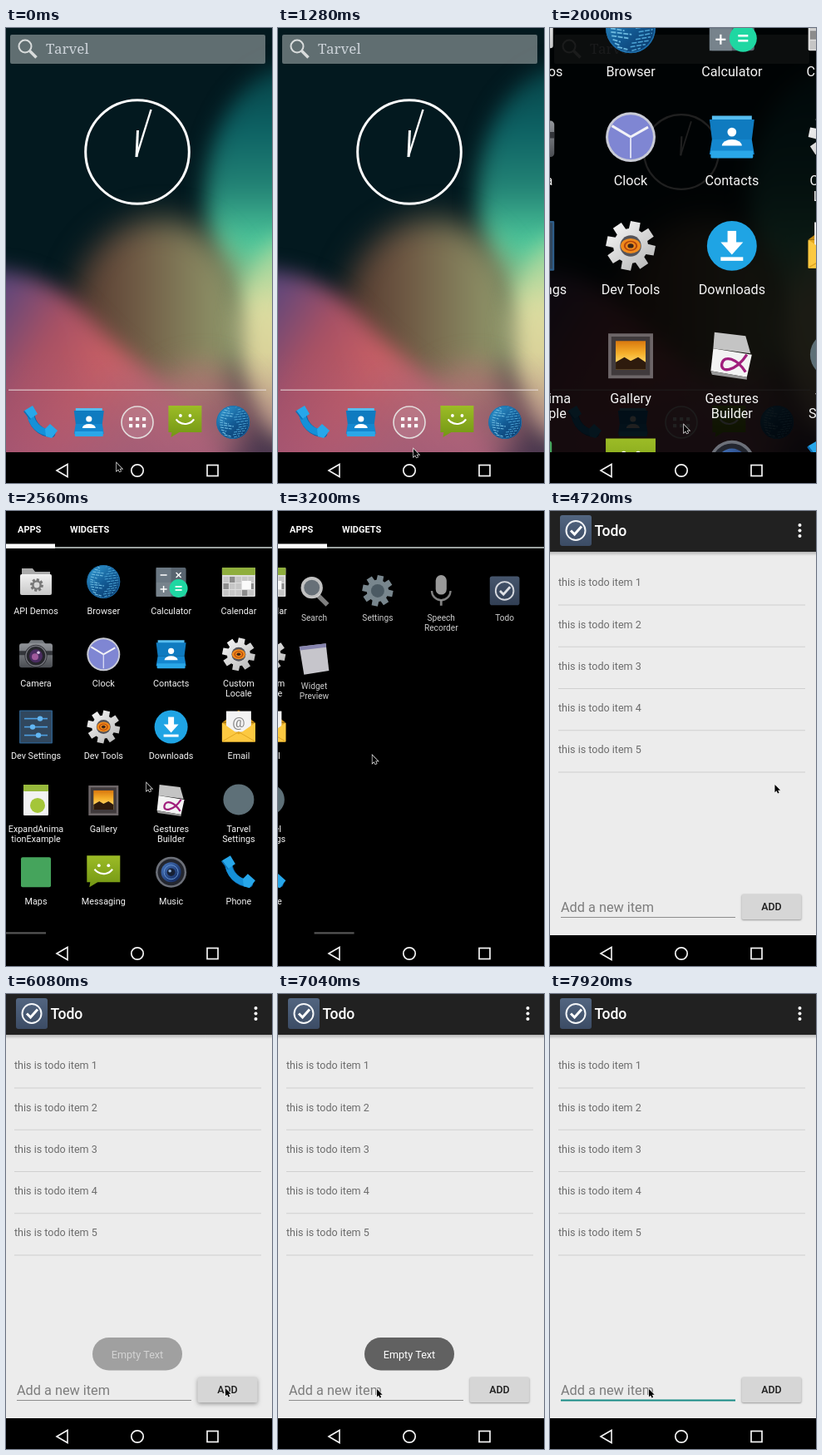
An HTML page with a canvas that plays this animation: 320x547 px, repeating every 8000 ms.

```html
<!DOCTYPE html>
<html lang="en">
<head>
<meta charset="utf-8">
<title>Todo app demo</title>
<style>
html, body { margin: 0; width: 100%; height: 100%; overflow: hidden; background: #000; }
canvas { display: block; width: 320px; height: 547px; }
</style>
</head>
<body>
<canvas id="stage"></canvas>
<script>
const W = 320, H = 547, BODY = 510, LOOP = 8000, TAU = Math.PI * 2;
const canvas = document.getElementById('stage');
const dpr = window.devicePixelRatio || 1;
canvas.width = W * dpr;
canvas.height = H * dpr;
const screen = canvas.getContext('2d');
let c = screen;

const clamp = v => Math.max(0, Math.min(1, v));
const span = (t, from, to) => clamp((t - from) / (to - from));
const mix = (a, b, k) => a + (b - a) * k;
const smooth = k => k * k * (3 - 2 * k);
const easeOut = (k, p = 2) => 1 - Math.pow(1 - k, p);

// Drawing helpers
function rect(x, y, w, h, color, r = 0) {
  c.fillStyle = color;
  c.beginPath();
  c.roundRect(x, y, w, h, r);
  c.fill();
}
function disc(x, y, r, color) {
  c.fillStyle = color;
  c.beginPath();
  c.arc(x, y, r, 0, TAU);
  c.fill();
}
function ring(x, y, r, color, width, from = 0, to = TAU) {
  c.strokeStyle = color;
  c.lineWidth = width;
  c.beginPath();
  c.arc(x, y, r, from, to);
  c.stroke();
}
function trace(points, closed) {
  c.beginPath();
  for (let i = 0; i < points.length; i += 2) c.lineTo(points[i], points[i + 1]);
  if (closed) c.closePath();
}
function poly(points, color) {
  trace(points, true);
  c.fillStyle = color;
  c.fill();
}
function line(points, color, width, closed = false) {
  trace(points, closed);
  c.strokeStyle = color;
  c.lineWidth = width;
  c.stroke();
}
function text(str, x, y, size, color, weight = 400, align = 'left', family = 'Roboto, sans-serif') {
  c.font = `${weight} ${size}px ${family}`;
  c.fillStyle = color;
  c.textAlign = align;
  c.fillText(str, x, y);
}
function shade(x0, y0, x1, y1, ...colors) {
  const g = c.createLinearGradient(x0, y0, x1, y1);
  colors.forEach((color, i) => g.addColorStop(i / (colors.length - 1), color));
  return g;
}
function at(x, y, scale, draw) {
  c.save();
  c.translate(x, y);
  c.scale(scale, scale);
  draw();
  c.restore();
}

// Icons, each centred on 0,0 and about 40 px wide
function gear(color, hub) {
  c.fillStyle = color;
  c.beginPath();
  for (let i = 0; i < 8; i++) {
    const a = i / 8 * TAU + 0.2;
    [[-0.3, 14], [-0.2, 20], [0.2, 20], [0.3, 14]].forEach(([d, r]) =>
      c.lineTo(Math.cos(a + d) * r, Math.sin(a + d) * r));
  }
  c.closePath();
  c.fill();
  disc(0, 0, 8.5, hub);
}

const icons = {
  browser() {
    disc(0, 0, 20, shade(-14, -18, 14, 18, '#3097cf', '#135c96', '#0b3a6c'));
    c.save();
    c.beginPath();
    c.arc(0, 0, 19.5, 0, TAU);
    c.clip();
    c.setLineDash([4, 1]);
    for (let i = -6; i <= 6; i++) {
      const y = i * 3, w = Math.sqrt(400 - y * y);
      line([-w * 0.8, y, -w * 0.8 + w * (0.55 + 0.3 * Math.sin(i * 1.3)), y + 2], '#6cb9df', 1.2);
      line([w * 0.2 + 3 * Math.sin(i), y, w * 0.9, y - 2], '#4ba3d4', 1);
    }
    c.restore();
    ring(0, 0, 19.4, '#1d6ea9', 1);
  },
  phone() {
    c.lineCap = 'round';
    const handset = (color, width, d) => {
      c.strokeStyle = color;
      c.lineWidth = width;
      c.beginPath();
      c.moveTo(-13 + d, -12 + d);
      c.bezierCurveTo(-12 + d, 2 + d, -2 + d, 12 + d, 12 + d, 13 + d);
      c.stroke();
    };
    handset('#0b64a6', 9, 0.8);
    handset('#1590d8', 8, 0);
    poly([-20, -14, -10, -20, -4, -10, -13, -4], '#27a7ea');
    poly([5, 8, 11, 2, 20, 10, 13, 19, 6, 17], '#27a7ea');
    line([-20, -13, -13, -4], '#0d70b5', 1.5);
  },
  contacts() {
    rect(-16, -17, 32, 4, '#56bdf0');
    poly([-18, -14, 18, -14, 16, 2, -16, 2], '#0f7bc0');
    poly([-16, 2, 16, 2, 18, 14, -18, 14], '#1487cf');
    rect(-17, 11, 34, 6, '#2aa7e8', 1);
    disc(0, -4, 3.6, '#fff');
    c.fillStyle = '#fff';
    c.beginPath();
    c.ellipse(0, 7, 8, 5, 0, Math.PI, TAU);
    c.fill();
  },
  messaging() {
    poly([-20, -20, 20, -20, 20, 12, -7, 12, -17, 18, -16, 12, -20, 12], shade(0, -20, 0, 14, '#9cbc26', '#779a16'));
    disc(-5.5, -8, 1.9, '#fff');
    disc(6, -8, 1.9, '#fff');
    ring(0, -11, 13, '#fff', 2.2, 0.6, Math.PI - 0.6);
  },
  folder() {
    poly([-17, -16, -4, -16, -1, -12, 17, -12, 17, 14, -17, 14], '#aaa');
    rect(-19, -9, 38, 25, shade(0, -9, 0, 16, '#f1f1f1', '#c8c8c8'), 2);
    at(1, 4, 0.4, () => gear('#777', '#d8d8d8'));
  },
  calculator() {
    rect(-18, -17, 36, 35, '#596570', 2);
    rect(-18, -17, 18, 17.5, '#6b7883');
    rect(-18, 0.5, 18, 17.5, '#77838c');
    line([-13, -8, -5, -8], '#fff', 1.5);
    line([6, -11, 12, -5], '#fff', 1.4);
    line([12, -11, 6, -5], '#fff', 1.4);
    line([-13, 9, -5, 9], '#fff', 1.5);
    line([-9, 5, -9, 13], '#fff', 1.5);
    disc(9, 8, 11, '#1fd7a2');
    line([5, 6, 13, 6], '#fff', 1.7);
    line([5, 10, 13, 10], '#fff', 1.7);
  },
  calendar() {
    rect(-20, -17, 40, 35, '#dedede', 1);
    rect(-20, -17, 40, 9, '#8fae3d', 1);
    for (let i = 0; i < 15; i++) {
      const col = i % 5, row = Math.floor(i / 5);
      rect(-18.5 + col * 7.5, -6 + row * 8, 6.5, 7, (col + row) % 4 === 1 ? '#8c8c8c' : '#c6c6c6');
    }
    rect(4, -1, 11, 10, '#fafafa');
  },
  camera() {
    poly([-10, -12, -6, -17, 8, -17, 12, -12], '#777b80');
    rect(-20, -13, 40, 29, shade(0, -13, 0, 16, '#92959a', '#4a4d52'), 3);
    rect(-20, -4, 40, 5, '#33353a');
    disc(0, 2, 13.5, '#26262c');
    ring(0, 2, 12, '#73757b', 1.5);
    disc(0, 2, 8, '#4a2c61');
    disc(-1, 3, 4, '#a05a9c');
    disc(3, -2, 1.8, '#d7c2e2');
  },
  clock() {
    disc(0, 0, 20, '#c9cbd6');
    disc(0, 0, 18, '#7f86d3');
    line([-15, -9, 0, 0, 14, -8], '#f2f2f7', 2);
    line([0, 0, 0, 17], '#dcdef4', 1.3);
  },
  tools() {
    gear(shade(-15, -18, 15, 18, '#f5f5f5', '#b9b9b9'), '#55545a');
    c.scale(1, 0.75);
    disc(0, 0, 8, '#f08a1c');
    ring(0, 0, 4.8, '#b4460c', 1.4);
    disc(0, 0, 2.4, '#3a2418');
  },
  sliders() {
    rect(-20, -20, 40, 40, '#2d5c87', 1);
    rect(-18.5, -18.5, 37, 37, '#31475d');
    [[-10, 5], [0, -4], [10, 3]].forEach(([y, x]) => {
      line([-14, y, 14, y], '#4e9fe0', 1.6);
      disc(x, y, 3.2, '#62b6f2');
    });
  },
  downloads() {
    disc(0, 0, 20, '#1fa4e4');
    rect(-3.5, -12, 7, 10, '#fff');
    poly([-9, -3, 9, -3, 0, 7], '#fff');
    rect(-9, 9, 18, 3, '#fff');
  },
  email() {
    rect(-20, -5, 40, 23, '#e5a71d', 1);
    poly([-20, -5, 0, -20, 20, -5], '#c48a12');
    rect(-15, -19, 30, 25, '#f3f3f3');
    text('@', 0, 0, 17, '#858585', 400, 'center');
    poly([-20, -5, 0, 9, 20, -5, 20, 18, -20, 18], '#fcc941');
    line([-19, 17, 0, 6, 19, 17], '#e0a521', 1);
  },
  project() {
    rect(-15, -18, 30, 37, '#f2f2f2', 1);
    rect(-15, -18, 30, 8, '#97b93b', 1);
    disc(2, 7, 9, '#a4c639');
  },
  gallery() {
    rect(-18, -17, 36, 36, '#6d6668');
    rect(-15.5, -14.5, 31, 31, '#403a3c');
    rect(-12, -11, 24, 23, shade(0, -11, 0, 9, '#d9780e', '#f6b02c', '#ffe27a'));
    poly([-12, 6, -5, 2, 0, 5, 6, 2, 12, 6, 12, 12, -12, 12], '#2e1b0d');
  },
  gestures() {
    poly([-14, -18, 11, -15, 15, -1, -15, -5], '#c4c4c4');
    poly([-15, -5, 16, 0, 12, 18, -17, 13], '#f3f3f3');
    poly([-17, 13, 12, 18, 12, 20, -16, 16], '#999');
    c.strokeStyle = '#a01e7c';
    c.lineWidth = 2.2;
    c.beginPath();
    c.moveTo(12, 0);
    c.bezierCurveTo(3, 14, -10, 15, -8, 7);
    c.bezierCurveTo(-6, 0, 4, 3, 11, 14);
    c.stroke();
  },
  service() { disc(0, 0, 18.5, '#5e7078'); },
  maps() { rect(-18, -18, 36, 36, '#45a45c', 2); },
  music() {
    disc(0, 0, 18.5, '#6c7079');
    disc(0, 0, 16, '#23262f');
    disc(0, 0, 12, shade(-8, -8, 8, 8, '#3e69ad', '#172e64'));
    ring(0, 0, 8.5, '#6493d0', 1);
    disc(0, 0, 4.8, '#172034');
    disc(-1.5, -1.5, 1.8, '#8fb2de');
  },
  search() {
    line([5, 6, 17, 18], '#999', 6);
    disc(-3, -4, 14, '#e6e6e6');
    disc(-3, -4, 10, '#56616a');
  },
  settings() { gear('#90a0a8', '#43525a'); },
  recorder() {
    rect(-7, -20, 14, 25, '#b7b7b7', 7);
    ring(0, 0, 12, '#999', 2.5, 0, Math.PI);
    line([0, 12, 0, 19], '#999', 3);
  },
  todo() {
    rect(-19, -18.5, 38, 37, shade(0, -18, 0, 18, '#526580', '#3c4c65'), 3);
    ring(0, 0, 11.5, '#f4f6f8', 2);
    line([-6, 0, -1.5, 4.5, 7, -5], '#fff', 3);
  },
  widgets() {
    poly([-19, -16, 15, -20, 19, 15, -13, 20], '#ecebf2');
    poly([-19, -16, 15, -20, 15.5, -15, -18, -11], '#7a78a8');
  }
};

const pages = [
  ['folder|API Demos', 'browser|Browser', 'calculator|Calculator', 'calendar|Calendar',
   'camera|Camera', 'clock|Clock', 'contacts|Contacts', 'tools|Custom|Locale',
   'sliders|Dev Settings', 'tools|Dev Tools', 'downloads|Downloads', 'email|Email',
   'project|ExpandAnima|tionExample', 'gallery|Gallery', 'gestures|Gestures|Builder', 'service|Tarvel|Settings',
   'maps|Maps', 'messaging|Messaging', 'music|Music', 'phone|Phone'],
  ['search|Search', 'settings|Settings', 'recorder|Speech|Recorder', 'todo|Todo', 'widgets|Widget|Preview']
];

function drawPage(list) {
  list.forEach((entry, i) => {
    const [icon, ...label] = entry.split('|');
    const x = 36 + (i % 4) * 81.3, y = 85 + Math.floor(i / 4) * 87.3;
    at(x, y, 1, icons[icon]);
    label.forEach((row, n) => text(row, x, y + 38.7 + n * 12.3, 10.8, '#f4f4f4', 400, 'center'));
  });
}

// Wallpaper of blurred blobs, painted once
function makeWallpaper() {
  const sheet = document.createElement('canvas');
  sheet.width = W;
  sheet.height = BODY;
  c = sheet.getContext('2d');
  rect(0, 0, W, BODY, '#03191f');
  const blob = (x, y, rx, ry, blur, fill, alpha = 1) => {
    c.filter = `blur(${blur}px)`;
    c.globalAlpha = alpha;
    c.fillStyle = fill;
    c.beginPath();
    c.ellipse(x, y, rx, ry, 0, 0, TAU);
    c.fill();
  };
  blob(350, 205, 110, 160, 13, shade(0, 55, 0, 330, '#07454a', '#0d6264', '#238375', '#4fcb9d', '#8fc08c'));
  blob(185, 352, 108, 122, 18, shade(75, 0, 300, 0, '#4f352c', '#6d5642', '#84805c', '#96a673'));
  blob(345, 375, 66, 125, 13, shade(0, 260, 0, 490, '#8fd59c', '#dcdca0', '#d9cf98', '#c3ab88'));
  blob(235, 470, 62, 62, 18, '#bb7a74', 0.8);
  c.filter = 'blur(12px)';
  c.globalAlpha = 0.95;
  c.fillStyle = shade(0, 310, 190, 430, '#664a80', '#b05468', '#cc6067', '#bb6a72');
  c.beginPath();
  c.moveTo(-30, 290);
  c.bezierCurveTo(60, 291, 85, 333, 126, 373);
  c.bezierCurveTo(180, 420, 245, 460, 275, 545);
  c.lineTo(-30, 545);
  c.fill();
  c.filter = 'none';
  c.globalAlpha = 1;
  rect(0, 390, W, 120, shade(0, 390, 0, 510, 'rgba(150,85,130,0)', 'rgba(150,85,130,.45)'));
  c = screen;
  return sheet;
}
const wallpaper = makeWallpaper();

function drawHome(t) {
  c.drawImage(wallpaper, 0, 0, W, BODY);
  rect(5, 8, 307, 35, 'rgba(180,185,185,.53)', 2);
  ring(23, 22, 7.5, '#d9dcdc', 2);
  line([28.5, 27.5, 36.5, 35.5], '#d9dcdc', 3.5);
  text('Tarvel', 48, 31, 17, '#cbd2d8', 400, 'left', '"Noto Serif", serif');

  // The clock page shrinks as the drawer arrives.
  at(158, 149, 1 - 0.32 * easeOut(span(t, 1840, 2090)), () => {
    ring(0, 0, 62.3, '#fff', 3);
    line([-1, 6, 0.5, -26], '#fff', 3);
    line([-1.2, 6, 16.5, -51], '#fff', 2.4);
  });

  rect(3, 434.5, 310, 1.4, 'rgba(235,225,225,.65)');
  ['phone', 'contacts', '', 'messaging', 'browser'].forEach((name, i) => {
    if (name) at(42 + i * 57.8, 474, 1, icons[name]);
  });
  disc(158, 474, 19, 'rgba(255,255,255,.12)');
  ring(158, 474, 19, '#e3dcdc', 1.6);
  for (let i = 0; i < 6; i++) rect(148 + (i % 3) * 8, 468 + Math.floor(i / 3) * 8, 4.2, 4.2, '#fff', 0.5);
}

function drawDrawer(t) {
  // The drawer zooms down into place while it fades over the home screen.
  const k = span(t, 1840, 2330);
  const settle = easeOut(Math.min(1, 1.13 * k / (k + 0.13)), 1.5);
  const zoom = 7 - 6 * settle;
  const alpha = easeOut(span(t, 1840, 1990));
  c.save();
  c.beginPath();
  c.rect(0, 0, W, BODY);
  c.clip();
  c.globalAlpha = easeOut(span(t, 1840, 2090));
  rect(0, 0, W, BODY, '#000');
  c.globalAlpha = alpha;
  c.translate(158, 255);
  c.scale(zoom, zoom);
  c.translate(-158, -255);
  text('APPS', 14, 25.5, 11, '#fff', 700);
  text('WIDGETS', 77, 25.5, 11, '#fff', 700);
  rect(0, 43.3, W, 1.5, '#cfd8d6');
  rect(0, 39.5, 59, 5.5, '#fff');

  const drag = 0.36 * smooth(span(t, 2780, 3020));
  const swipe = mix(drag, 1, easeOut(span(t, 3020, 3400), 3));
  if (swipe > 0) {
    const rest = 1 - swipe, depth = 1.5 * rest / (rest + 0.5);
    c.save();
    c.globalAlpha = Math.pow(swipe, 1.8);
    at(160, 265, 1 - 0.26 * depth, () => {
      c.translate(-160, -265);
      drawPage(pages[1]);
    });
    c.restore();
  }
  if (swipe < 1) {
    c.save();
    c.translate(-W * swipe, 0);
    drawPage(pages[0]);
    c.restore();
  }
  c.globalAlpha = alpha * (1 - span(t, 3380, 3520));
  rect(48 * swipe, 506.3, 48, 2.2, '#555');
  c.restore();
}

function drawLaunch(t) {
  const k = span(t, 3727, 4005), q = easeOut(k);
  const left = mix(244, 0, q), top = mix(55, 0, q), bottom = mix(65, BODY, q);
  c.globalAlpha = clamp(k * 3);
  rect(left, top, W - left, bottom - top, '#ebebeb');
  if (k < 1) rect(319, top, 1, bottom - top, '#aaa');
  c.globalAlpha = 1;
}

function drawApp(t) {
  rect(0, 0, W, BODY, '#ececec');
  rect(0, 49, W, 5, shade(0, 49, 0, 54, '#b5b5b5', '#ececec'));
  rect(0, 0, W, 49, '#212121');
  at(31, 23.5, 1, icons.todo);
  text('Todo', 53.5, 30, 17.6, '#fff', 500);
  [17, 23.5, 30].forEach(y => disc(300.5, y, 2, '#fff'));

  for (let i = 0; i < 5; i++) {
    const y = i * 50.25;
    text('this is todo item ' + (i + 1), 10, 90.3 + y, 12.55, '#6c6c6c');
    rect(10, 112.6 + y, 297, 1, '#d0d0d0');
  }

  text('Add a new item', 13, 481.5, 16.3, '#7d7d7d');
  if (t >= 7280) rect(13, 487.4, 210, 2, '#168b85');
  else rect(13, 488, 210, 1.1, '#8c8c8c');

  const press = span(t, 5840, 5960) * (1 - span(t, 6240, 6440));
  c.save();
  c.shadowColor = 'rgba(0,0,0,.35)';
  c.shadowBlur = (2 + 3 * press) * dpr;
  c.shadowOffsetY = (1 + press) * dpr;
  rect(230.5, 460.5, 72, 30.5, '#d6d6d6', 2);
  c.restore();
  text('ADD', 266.5, 480.3, 12.4, '#1c1c1c', 500, 'center');

  const fade = easeOut(span(t, 5920, 6420)) * (1 - Math.pow(span(t, 7420, 7900), 2));
  if (fade > 0) {
    c.globalAlpha = fade;
    rect(104, 413, 108, 39.5, '#616161', 19.7);
    text('Empty Text', 158, 437.8, 12.6, '#fff', 400, 'center');
    c.globalAlpha = 1;
  }
}

function drawNav(t) {
  rect(0, BODY, W, H - BODY, '#000');
  if (t >= 3720 && t < 4000) {
    rect(0, BODY, W, H - BODY, shade(0, 0, W, 0, '#5a3a44', '#8e4a60', '#b05e72', '#a3666f', '#82876f'));
  }
  line([61, 532, 74, 524.5, 74, 539.5], '#f4f4f4', 1.6, true);
  ring(158, 532, 7.2, '#f4f4f4', 1.7);
  c.strokeRect(242, 525.5, 13, 13);
}

const path = [
  [80, 133, 523], [960, 163, 506], [1300, 163, 506], [1720, 161, 477], [2080, 161, 477],
  [2560, 169, 327], [2760, 226, 300], [3020, 110, 298], [3160, 110, 298], [3640, 281, 93],
  [4280, 281, 93], [5040, 264, 474], [6600, 264, 474], [7040, 119, 475], [LOOP, 119, 475]
];
function drawPointer(t) {
  const n = Math.max(1, path.findIndex(key => key[0] > t));
  const [t0, x0, y0] = path[n - 1], [t1, x1, y1] = path[n];
  const k = smooth(span(t, t0, t1));
  const lift = t0 === 6600 ? 26 * Math.sin(Math.PI * k) : 0;
  at(mix(x0, x1, k), mix(y0, y1, k) - lift, 0.85, () => {
    const arrow = [0, 0, 0, 11, 2.5, 8.7, 4.2, 12.3, 6, 11.5, 4.3, 8, 7.8, 8];
    line(arrow, '#eee', 1.6, true);
    poly(arrow, '#000');
  });
}

function frame() {
  const t = performance.now() % LOOP;
  c.setTransform(dpr, 0, 0, dpr, 0, 0);
  c.lineCap = 'butt';
  if (t < 2100) drawHome(t);
  if (t >= 1840 && t < 4000) drawDrawer(t);
  if (t >= 3720 && t < 4240) drawLaunch(t);
  if (t >= 4240) drawApp(t);
  drawNav(t);
  drawPointer(t);
  requestAnimationFrame(frame);
}
requestAnimationFrame(frame);
</script>
</body>
</html>
```
